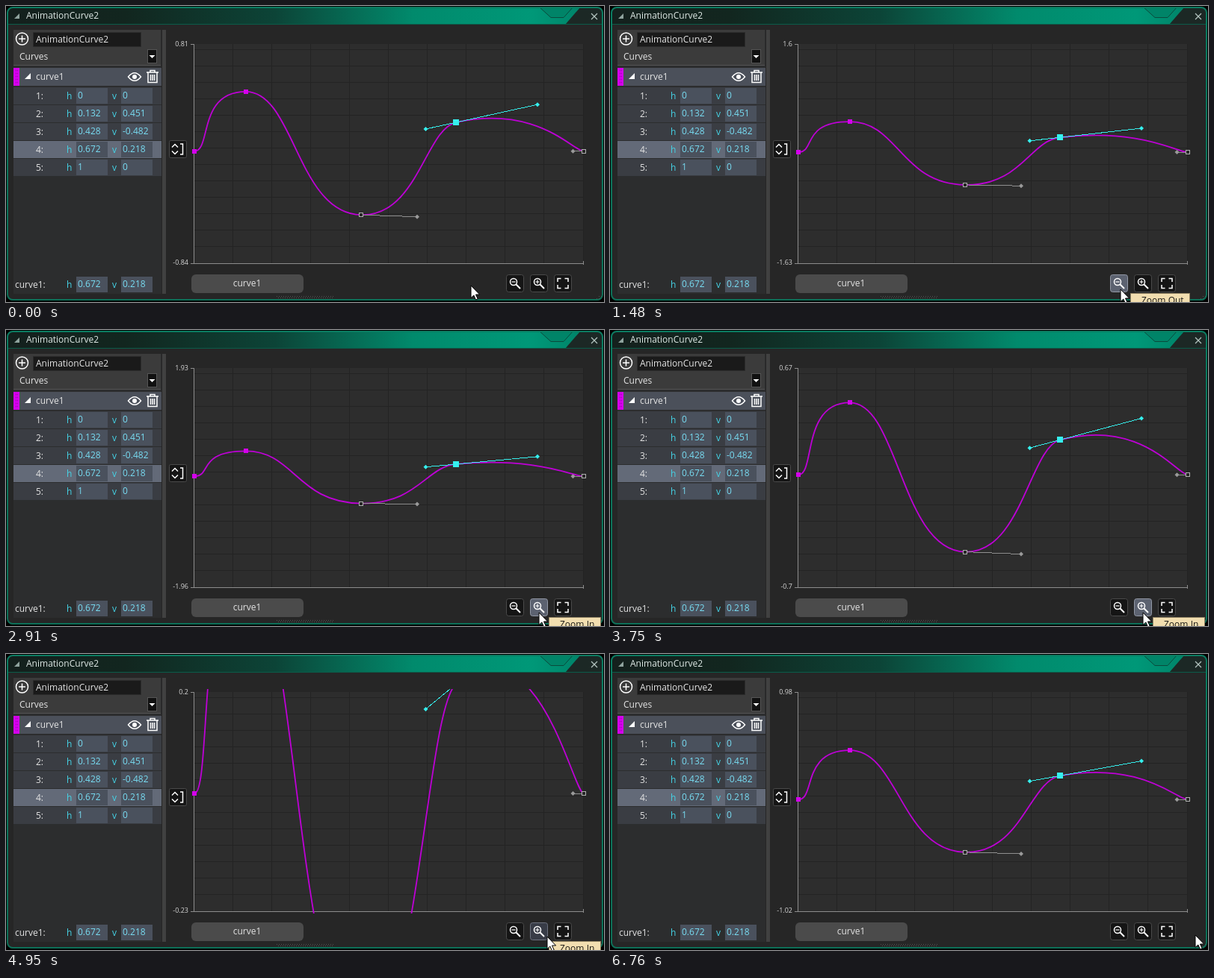
These frames come from a looping animation (800x397 px, 7.17 s). An HTML page:

```html
<!DOCTYPE html>
<html lang="en">
<head>
<meta charset="utf-8">
<title>Curve editor</title>
<style>
  html, body { margin: 0; width: 100%; height: 100%; overflow: hidden; background: #000; }
  svg { display: block; width: 800px; height: 397px; font: 12px "Open Sans", "Noto Sans", sans-serif; fill: #e4e4e4; }
  text { white-space: pre; }
  .cyan { fill: #45d3e6; }
  .value { fill: #78dcf2; }
  .axis { font-size: 9px; text-anchor: end; fill: #d8d8d8; }
  .crisp { shape-rendering: crispEdges; }
  .icon { fill: none; stroke: #fff; stroke-width: 1.5; }
  .btn { fill: #151515; stroke: #4a4a4a; }
  .btn.hover { fill: #383c47; stroke: #6d7280; }
  .btn.down { fill: #5c6270; stroke: #9298a5; }
</style>
</head>
<body>
<svg viewBox="0 0 800 397">
  <defs>
    <linearGradient id="bar">
      <stop offset="0" stop-color="#14201d"/>
      <stop offset=".2" stop-color="#12261f"/>
      <stop offset=".45" stop-color="#0c4437"/>
      <stop offset=".68" stop-color="#018a6c"/>
      <stop offset=".88" stop-color="#009878"/>
      <stop offset="1" stop-color="#007a62"/>
    </linearGradient>
    <linearGradient id="edge" x2="0" y2="1">
      <stop offset="0" stop-color="#0b7d62"/>
      <stop offset="1" stop-color="#0d7058"/>
    </linearGradient>
    <clipPath id="plot"><rect x="244" y="47" width="536" height="301"/></clipPath>
    <clipPath id="frame"><rect x="2" y="2" width="796" height="393" rx="7"/></clipPath>
  </defs>

  <!-- window -->
  <g clip-path="url(#frame)">
    <rect width="800" height="397" fill="#262626"/>
    <rect width="800" height="25" fill="url(#bar)"/>
    <path d="M748 25 L768 2 H800 V25Z" fill="#1c2825"/>
    <path d="M713 1 L729 15.500 H746 L759 1Z" fill="#008468" stroke="#0b4a3c"/>
    <rect y="24" width="800" height="1" fill="#0b5c49"/>
  </g>
  <rect x="2" y="2" width="796" height="392" rx="7" fill="none" stroke="url(#edge)" stroke-width="2"/>
  <path d="M18 10 V17 H11Z" fill="#8fa39e"/>
  <text x="27" y="17" fill="#dfe9e6">AnimationCurve2</text>
  <path d="M783 10 L791 18 M791 10 L783 18" stroke="#b4c4c0" stroke-width="1.200"/>
  <path d="M362 389.500 H439 M364 391.500 H437" stroke="#555" stroke-dasharray="1 2"/>
  <path d="M790 392.500 H796 M793 389.500 H797" stroke="#4c5753" stroke-dasharray="1 2"/>

  <!-- side panel -->
  <g class="crisp">
    <rect x="10" y="32" width="198" height="354" fill="#2c2d2e"/>
    <rect x="10" y="32" width="197" height="47" fill="#3b3b3b"/>
    <rect x="10" y="79" width="197" height="1" fill="#555"/>
    <rect x="36" y="35" width="144" height="19" fill="#1a1a1a" stroke="#2b2b2b"/>
    <rect x="189.500" y="58.500" width="12" height="18" fill="#111" stroke="#555"/>
    <rect x="10" y="83" width="198" height="24" fill="#4b505a"/>
    <rect x="10" y="83" width="8" height="24" fill="#d400ec"/>
    <path d="M13 86 V104 M15 86 V104" stroke="#9b00ae" stroke-dasharray="1 3"/>
    <rect x="209" y="32" width="5" height="354" fill="#414141"/>
  </g>
  <circle cx="21.5" cy="44" r="8" class="icon"/>
  <path d="M17 44 H26 M21.5 39.500 V48.500" class="icon" stroke-width="2"/>
  <text x="40" y="49">AnimationCurve2</text>
  <text x="18" y="72">Curves</text>
  <path d="M191.500 66 H199.500 L195.500 70Z" fill="#fff"/>
  <path d="M33 90 V98 H25Z" fill="#fff"/>
  <text x="40" y="99">curve1</text>
  <path d="M163.500 95 Q172 84.500 180.500 95 Q172 105.500 163.500 95Z" class="icon"/>
  <circle cx="172" cy="95" r="3" fill="#fff"/>
  <path d="M188 89 H204 M193 89 V86.500 H199 V89 M190 89 V102.500 H202 V89 M193.500 92 V100 M196 92 V100 M198.500 92 V100" class="icon" stroke-width="1.2"/>
  <g id="rows"></g>
  <text x="12" y="378">curve1:</text>

  <!-- plot -->
  <rect x="252" y="51" width="521" height="294" fill="#2d2d2d"/>
  <path id="grid" class="crisp" stroke="#232323" fill="none"/>
  <path d="M247 51.500 H252 M251.500 51 V346 M247 345.500 H773 M772.500 342 V347" class="crisp" stroke="#8c8c8c" fill="none"/>
  <text id="top" class="axis" x="244" y="54"></text>
  <text id="bottom" class="axis" x="244" y="347"></text>
  <rect x="218.500" y="180.500" width="23" height="23" rx="2" class="btn"/>
  <path d="M222 189.500 L226 185.500 L230 189.500 M222 194.500 L226 198.500 L230 194.500 M233 185 H236.500 V199 H233" class="icon"/>
  <g clip-path="url(#plot)">
    <path id="curve" fill="none" stroke="#be00d6" stroke-width="1.8"/>
    <path id="greyArms" class="crisp" stroke="#8f8f8f" fill="none"/>
    <path id="cyanArms" class="crisp" stroke="#35f0ee" fill="none"/>
    <g id="marks"></g>
  </g>

  <!-- bottom bar -->
  <rect x="248" y="360" width="150" height="25" rx="6" fill="#4b4b4b"/>
  <text x="322.500" y="376" text-anchor="middle">curve1</text>
  <g id="buttons"></g>
  <g class="icon">
    <circle cx="679" cy="370" r="4.500"/>
    <path d="M682.500 373.500 L688 379" stroke-width="2"/>
    <path d="M676.500 370 H681.500" stroke-width="1.200"/>
    <circle cx="711" cy="370" r="4.500"/>
    <path d="M714.500 373.500 L720 379" stroke-width="2"/>
    <path d="M708.500 370 H713.500 M711 367.500 V372.500" stroke-width="1.200"/>
    <path d="M738 370 V365.500 H742.500 M747.500 365.500 H752 V370 M752 374 V378.500 H747.500 M742.500 378.500 H738 V374"/>
  </g>

  <g id="tip">
    <rect id="tipBox" y="385.500" height="22" fill="#f2deb0" stroke="#8f8263"/>
    <text id="tipText" y="399" fill="#1c1a15"></text>
  </g>
  <path id="pointer" d="M0 0 V16.500 L3.800 13 L6.500 19 L9.200 17.900 L6.500 12 H11.600Z" fill="#fff" stroke="#000"/>
</svg>
<script>
const LOOP = 7170;
const $ = id => document.getElementById(id);
const rect = (x, y, w, h, fill) =>
  `<rect x="${x}" y="${y}" width="${w}" height="${h}" fill="${fill}" class="crisp"/>`;
const label = (x, y, s, cls = '') => `<text x="${x}" y="${y}" class="${cls}">${s}</text>`;

// side panel rows
const keys = [[0, 0], [0.132, 0.451], [0.428, -0.482], [0.672, 0.218], [1, 0]];
const field = (x, y, s) => rect(x, y, 42, 21, '#4a515d') + label(x + 2, y + 14, s, 'value');
const row = ([h, v], i) => {
  const y = 110 + i * 24;
  return rect(10, y - 1, 198, 23, i === 3 ? '#636a78' : '#3a3d43') +
    label(40, y + 15, i + 1 + ':') +
    label(81, y + 15, 'h', 'cyan') + field(94, y, h) +
    label(142, y + 15, 'v', 'cyan') + field(154, y, v);
};
$('rows').innerHTML = keys.map(row).join('') +
  label(81, 378, 'h', 'cyan') + field(94, 363, 0.672) +
  label(142, 378, 'v', 'cyan') + field(154, 363, 0.218);

let grid = '';
for (let i = 1; i <= 10; i++) grid += `M${Math.floor(251 + i * 52.1) + 0.5} 51V345`;
for (let y = 322.5; y > 51; y -= 22) grid += `M252 ${y}H773`;
$('grid').setAttribute('d', grid);

// toolbar buttons: left edge, tooltip text, tooltip box, tooltip start
const tools = [
  { x: 669, tip: 'Zoom Out', tipX: 697, width: 79, shows: 1020 },
  { x: 701, tip: 'Zoom In', tipX: 727, width: 69, shows: 2810 },
  { x: 733, tip: 'Zoom To Fit', tipX: 759, width: 92, shows: 5590 }
];
$('buttons').innerHTML = tools.map(b =>
  `<rect x="${b.x + 0.5}" y="360.5" width="23" height="23" rx="3" class="btn"/>`).join('');
const faces = [...$('buttons').children];
const presses = [[740, 1810], [2550, 4670], [5540, 5690]];

// zoom runs: time, level, step, interval, repeats
const runs = [
  [0, -2, 0, 1, 0], [740, -1, 0, 1, 0], [1100, 0, 1, 73.3, 9],
  [2550, 8, 0, 1, 0], [2910, 7, 0, 1, 0], [2960, 6, -1, 79, 10],
  [3830, -5, -1, 71, 11], [5540, 0, 0, 1, 0]
];
function zoomAt(t) {
  const [at, level, step, every, count] = runs.filter(r => r[0] <= t).pop();
  return level + step * Math.min(count, Math.floor((t - at) / every));
}

const path = [
  [0, 622, 375], [50, 622, 375], [740, 683, 380], [2119, 683, 380], [2120, 684, 381],
  [2170, 686, 381], [2400, 713, 379], [4850, 713, 379], [4950, 724, 379], [5360, 745, 380],
  [6250, 745, 380], [6760, 783, 377], [LOOP, 783, 377]
];
function pointerAt(t) {
  const i = path.findIndex(p => p[0] > t);
  const [a, x0, y0] = path[i - 1], [b, x1, y1] = path[i];
  const k = (t - a) / (b - a);
  return [Math.round(x0 + (x1 - x0) * k), Math.round(y0 + (y1 - y0) * k)];
}

// curve as Bezier nodes: x in pixels, value
const nodes = [
  [252, 0], [275, 0], [256, 0.451], [320.8, 0.451],
  [386, 0.451], [389, -0.47], [475, -0.482],
  [550, -0.496], [561.5, 0.168], [602, 0.218],
  [711, 0.353], [758.5, 0], [773, 0]
];
const MID = (0.451 - 0.482) / 2;

const square = ([x, y], r, fill, stroke = 'none') =>
  `<rect x="${Math.round(x) - r}" y="${Math.round(y) - r}" width="${2 * r}" height="${2 * r}" fill="${fill}" stroke="${stroke}"/>`;
const diamond = ([x, y], fill) =>
  `<path d="M${x - 3} ${y}l3 -3l3 3l-3 3z" fill="${fill}"/>`;

let shown = null;
function drawPlot(level) {
  if (level === shown) return;
  shown = level;
  const half = 1.1 ** level, max = MID + half;
  $('top').textContent = +max.toFixed(2);
  $('bottom').textContent = +(MID - half).toFixed(2);
  const p = nodes.map(([x, v]) => [x, 51 + 293 * (max - v) / (2 * half)]);
  $('curve').setAttribute('d', `M${p[0]}C${p.slice(1).join(' ')}`);
  $('greyArms').setAttribute('d', `M${p[6]}L${p[7]}M${p[11]}L${p[12]}`);
  $('cyanArms').setAttribute('d', `M${p[8]}L${p[9]}L${p[10]}`);
  const cyan = '#35f0ee', grey = '#9a9a9a', pink = '#d400ec';
  $('marks').innerHTML =
    square(p[0], 3, pink) + square(p[3], 3, pink) +
    diamond(p[7], grey) + diamond(p[11], grey) +
    square(p[6], 2.5, '#262626', '#b0b0b0') + square(p[12], 2.5, '#262626', '#b0b0b0') +
    diamond(p[8], cyan) + diamond(p[10], cyan) + square(p[9], 4, cyan);
}

function render(t) {
  drawPlot(zoomAt(t));
  const [x, y] = pointerAt(t);
  $('pointer').setAttribute('transform', `translate(${x} ${y})`);

  const hot = tools.findIndex(b => x >= b.x && x < b.x + 24 && y < 384);
  const held = presses.some(([a, b]) => t >= a && t < b);
  faces.forEach((f, i) =>
    f.setAttribute('class', 'btn' + (i !== hot ? '' : held ? ' down' : ' hover')));

  const b = tools[hot];
  const age = b ? t - b.shows : -1;
  $('tip').setAttribute('opacity', age < 0 ? 0 : age < 30 ? 0.33 : age < 80 ? 0.67 : 1);
  if (b) {
    $('tipBox').setAttribute('x', b.tipX - 0.5);
    $('tipBox').setAttribute('width', b.width);
    $('tipText').setAttribute('x', b.tipX + 14);
    $('tipText').textContent = b.tip;
  }
}

const start = performance.now();
function tick() {
  render((performance.now() - start) % LOOP);
  requestAnimationFrame(tick);
}
tick();
</script>
</body>
</html>
```
